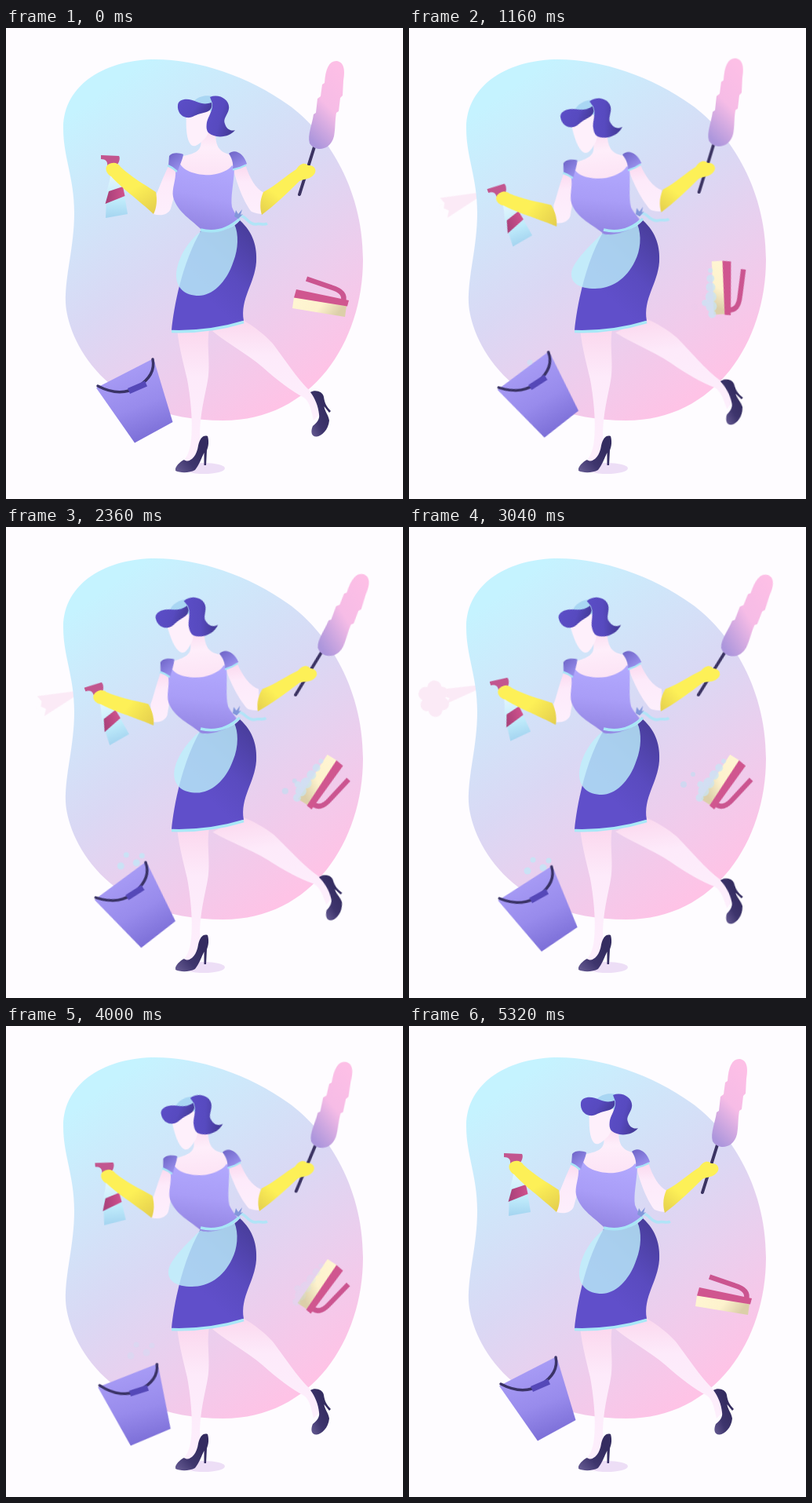
These frames come from a looping animation (506 by 600 pixels, 5.36 s). An HTML page:

```html
<!DOCTYPE html>
<html lang="en">
<head>
<meta charset="utf-8">
<title>Cleaning</title>
<style>
html, body { margin: 0; width: 100%; height: 100%; overflow: hidden; background: #fefcff; }
svg { display: block; width: 100%; height: 100%; }

.lean, .head, .fore, .reach, .duster, .ribbon, .apron, .kick, .bucket,
.splash, .bubbles, .brush, .foam, .drift, .cone, .puff {
  animation: 5.36s ease-in-out infinite;
}
.lean { animation-name: lean; transform-origin: 284px 246px; }
.head { animation-name: head; transform-origin: 255px 155px; }
.fore { animation-name: fore; transform-origin: 190px 225px; }
.reach { animation-name: reach; transform-origin: 325px 234px; }
.duster { animation-name: duster; transform-origin: 382px 185px; }
.ribbon { animation-name: ribbon; transform-origin: 296px 242px; }
.apron { animation-name: apron; }
.kick { animation-name: kick; transform-origin: 280px 385px; }
.bucket { animation-name: bucket; transform-origin: 170px 477px; }
.splash { animation-name: splash; transform-origin: 150px 432px; }
.bubbles { animation-name: bubbles; }
.brush { animation-name: brush; transform-origin: 402px 344px; }
.foam { animation-name: foam; }
.drift { animation-name: drift; }
.cone { animation-name: cone; transform-origin: 121px 165px; }
.puff { animation-name: puff; transform-origin: 62px 165px; }

@keyframes lean {
  0%, 6%, 85.8%, 100% { transform: none; }
  20%, 67.2% { transform: translate(-3px, 1px) rotate(-6deg); }
}
@keyframes head {
  0%, 7.5%, 93%, 100% { transform: rotate(0deg); }
  29.1%, 68.5% { transform: rotate(-12deg); }
}
@keyframes fore {
  0%, 6%, 76%, 100% { transform: none; }
  20%, 42% { transform: translate(0, 5px) rotate(-14deg); }
  53%, 60% { transform: translate(0, 4px) rotate(-9deg); }
}
@keyframes reach {
  0%, 87%, 100% { transform: rotate(0deg); }
  10% { transform: rotate(-2deg); animation-timing-function: ease-in; }
  21.6% { transform: rotate(6deg); animation-timing-function: linear; }
  32.1% { transform: rotate(12.5deg); animation-timing-function: ease-out; }
  48%, 60% { transform: rotate(13.5deg); }
  74.6% { transform: rotate(5.5deg); animation-timing-function: ease-out; }
}
@keyframes duster {
  0%, 89%, 100% { transform: rotate(0deg); }
  11% { transform: rotate(-4deg); animation-timing-function: ease-in; }
  21.6% { transform: rotate(-.4deg); animation-timing-function: linear; }
  32.1% { transform: rotate(1.5deg); animation-timing-function: ease-out; }
  48%, 60% { transform: rotate(7deg); }
  74.6% { transform: rotate(4deg); animation-timing-function: ease-out; }
}
@keyframes ribbon {
  0%, 6%, 75%, 100% { transform: none; }
  21%, 60% { transform: translate(-2px, -3px) rotate(-4deg); }
}
@keyframes apron {
  0%, 5.6%, 50%, 60%, 95%, 100% {
    d: path("M250 258C268 261 284 257 291 250C297 262 296 282 290 297C281 325 262 341 246 341C228 341 216 331 217 313C219 291 234 269 250 258Z");
  }
  20%, 33.5%, 71%, 76.5% {
    d: path("M250 258C268 261 284 257 291 250C297 264 295 284 288 297C277 320 258 332 237 332C217 332 206 325 207 312C209 297 232 276 250 258Z");
  }
}
@keyframes kick {
  0%, 5%, 73%, 100% { transform: rotate(0deg); }
  21.6% { transform: rotate(-7deg); animation-timing-function: ease-out; }
  32.1%, 42% { transform: rotate(-9deg); }
  56.7% { transform: rotate(-7deg); animation-timing-function: ease-in-out; }
}
@keyframes bucket {
  0%, 100% { transform: none; }
  21.6% { transform: translate(0, -7px) rotate(-9.5deg); animation-timing-function: ease-out; }
  32.1% { transform: translate(0, -8.5px) rotate(-13.5deg); }
  50% { transform: translate(0, 12px) rotate(-8deg); animation-timing-function: linear; }
  56.7% { transform: translate(0, 12px) rotate(-5.5deg); }
  74.6% { transform: translate(0, 7px) rotate(5.7deg); }
  87.3% { transform: translate(0, 5.5px) rotate(6.3deg); }
}
@keyframes splash {
  0%, 25% { opacity: 0; transform: scale(.1); animation-timing-function: ease-out; }
  32.1% { opacity: 1; transform: none; animation-timing-function: ease-out; }
  36% { opacity: .8; transform: translate(0, 4px) scale(1.1); }
  40%, 100% { opacity: 0; transform: translate(0, 12px) scale(1.08); }
}
@keyframes bubbles {
  0%, 19% { opacity: 0; transform: translate(-4px, 10px); }
  21.6% { opacity: .5; transform: translate(-4px, 2px); }
  32.1% { opacity: .8; transform: translate(-9px, -12px); }
  56.7% { opacity: .8; transform: none; }
  74.6% { opacity: .25; transform: translate(8px, -18px); }
  80%, 100% { opacity: 0; transform: translate(10px, -24px); }
}
@keyframes brush {
  0%, 5% { transform: none; animation-timing-function: ease-in; }
  21.6% { transform: translate(4px, -13px) rotate(78deg); animation-timing-function: ease-out; }
  30% { transform: translate(5px, -15px) rotate(114deg); }
  56.7% { transform: translate(4px, -15px) rotate(114deg); }
  74.6% { transform: translate(4px, -8px) rotate(115deg); animation-timing-function: ease-in; }
  87.3% { transform: translate(-5px, 3px) rotate(251deg); animation-timing-function: ease-out; }
  98%, 100% { transform: rotate(360deg); }
}
@keyframes foam {
  0%, 15% { opacity: 0; }
  21.6%, 58% { opacity: .75; }
  74.6% { opacity: .25; }
  79%, 100% { opacity: 0; }
}
@keyframes drift {
  0%, 20% { opacity: 0; transform: translate(14px, 28px); }
  32.1% { opacity: .8; transform: translate(11px, 16px); }
  56.7% { opacity: .7; transform: none; }
  68%, 100% { opacity: 0; transform: translate(-5px, -8px); }
}
@keyframes cone {
  0%, 20.1%, 42.5%, 52.9%, 79.1% { opacity: 1; transform: scale(0); animation-timing-function: ease-out; }
  21.6%, 44%, 54.4%, 80.6% { opacity: 1; transform: none; }
  23.9%, 46.3%, 56.8%, 82.8% { opacity: 1; transform: scaleY(.7); }
  26%, 48%, 58.6%, 84.8% { opacity: 0; transform: scaleY(.7); animation-timing-function: step-end; }
  100% { opacity: 0; transform: scale(0); }
}
@keyframes puff {
  0%, 21.6%, 44%, 54.4%, 80.6% { opacity: 0; transform: scale(.2); animation-timing-function: ease-out; }
  23.9%, 46.3%, 56.6%, 82.8% { opacity: 1; transform: none; }
  29.2%, 51.5%, 62%, 89% { opacity: 0; transform: translate(-2px, 0) scale(1.08); animation-timing-function: step-end; }
  100% { opacity: 0; transform: scale(.2); }
}
</style>
</head>
<body>
<svg viewBox="0 0 506 600" aria-label="Woman cleaning with spray, duster, bucket and brush">
  <defs>
    <linearGradient id="bg" gradientUnits="userSpaceOnUse" x1="110" y1="90" x2="375" y2="460">
      <stop stop-color="#c5f3ff"/><stop offset=".5" stop-color="#dad8f4"/><stop offset="1" stop-color="#fec3e6"/>
    </linearGradient>
    <linearGradient id="skirt" x1=".9" y1="0" x2=".4" y2=".7">
      <stop stop-color="#473c98"/><stop offset=".6" stop-color="#5a4bbf"/><stop offset="1" stop-color="#604fca"/>
    </linearGradient>
    <linearGradient id="bodice" x1=".6" y1="0" x2=".4" y2="1">
      <stop stop-color="#b2a9fe"/><stop offset=".5" stop-color="#a99df7"/><stop offset="1" stop-color="#9183e1"/>
    </linearGradient>
    <linearGradient id="sleeve" x1="0" y1="0" x2=".6" y2="1">
      <stop stop-color="#6d62c6"/><stop offset="1" stop-color="#9a92ee"/>
    </linearGradient>
    <linearGradient id="skin" x1="0" y1="0" x2="0" y2="1">
      <stop stop-color="#fbd8ee"/><stop offset=".35" stop-color="#fdeafa"/><stop offset="1" stop-color="#fdeffc"/>
    </linearGradient>
    <linearGradient id="chest" x1="0" y1="0" x2="0" y2="1">
      <stop stop-color="#fadcf0"/><stop offset=".4" stop-color="#feeefa"/><stop offset="1" stop-color="#fce3f5"/>
    </linearGradient>
    <linearGradient id="hair" x1="0" y1="0" x2="1" y2=".4">
      <stop stop-color="#5c4ec8"/><stop offset=".6" stop-color="#574abf"/><stop offset="1" stop-color="#463c9c"/>
    </linearGradient>
    <linearGradient id="cuffL" gradientUnits="userSpaceOnUse" x1="170" y1="200" x2="192" y2="235">
      <stop stop-color="#fdf057"/><stop offset="1" stop-color="#e3cd4d"/>
    </linearGradient>
    <linearGradient id="cuffR" gradientUnits="userSpaceOnUse" x1="345" y1="212" x2="324" y2="238">
      <stop stop-color="#fdf057"/><stop offset="1" stop-color="#e3cd4d"/>
    </linearGradient>
    <linearGradient id="bottle" x1="0" y1="0" x2="0" y2="1">
      <stop stop-color="#e6f6fd"/><stop offset=".6" stop-color="#bfebfb"/><stop offset="1" stop-color="#a4d4f0"/>
    </linearGradient>
    <linearGradient id="label" x1="0" y1="0" x2="1" y2="0">
      <stop stop-color="#a63f78"/><stop offset="1" stop-color="#d0528d"/>
    </linearGradient>
    <linearGradient id="feather" x1=".7" y1="0" x2=".3" y2="1">
      <stop stop-color="#fdbfe6"/><stop offset=".5" stop-color="#f6bce6"/><stop offset="1" stop-color="#ac96dc"/>
    </linearGradient>
    <linearGradient id="pail" x1=".3" y1=".1" x2=".6" y2="1">
      <stop stop-color="#a99df6"/><stop offset=".55" stop-color="#988bec"/><stop offset="1" stop-color="#7a6dd6"/>
    </linearGradient>
    <linearGradient id="shoe" x1="0" y1="1" x2=".7" y2=".3">
      <stop stop-color="#6a5f96"/><stop offset=".5" stop-color="#3e356d"/><stop offset="1" stop-color="#342c60"/>
    </linearGradient>
    <linearGradient id="bristle" x1="0" y1="0" x2="1" y2=".3">
      <stop stop-color="#fff6d3"/><stop offset=".6" stop-color="#fdf2cd"/><stop offset="1" stop-color="#dccfa9"/>
    </linearGradient>
  </defs>

  <!-- Spray, partly hidden by the backdrop -->
  <g class="lean"><g class="fore" fill="#fbeaf6">
    <path class="cone" d="M121 165L61 152L64 160L61 166L66 171L61 179Z"/>
    <g class="puff">
      <circle cx="47" cy="165" r="14"/><circle cx="38" cy="156" r="9"/><circle cx="51" cy="151" r="9"/>
      <circle cx="58" cy="160" r="8"/><circle cx="56" cy="174" r="8"/><circle cx="45" cy="179" r="9"/>
      <circle cx="36" cy="170" r="8"/>
    </g>
  </g></g>

  <path fill="url(#bg)" d="M190 40C130 40 73 70 73 128C73 165 87 190 87 235C87 280 75 315 76 350C78 395 125 500 277 500C390 500 455 400 455 295C455 200 405 130 360 98C310 62 245 40 190 40Z"/>

  <!-- Bucket -->
  <g class="splash" fill="#c8edfb">
    <path d="M69 407C78 404 89 407 95 417C85 417 75 415 69 407Z"/>
    <path d="M103 407C113 403 125 409 130 420C119 421 108 417 103 407Z"/>
    <path d="M82 430C94 425 110 430 118 440C105 442 89 440 82 430Z"/>
  </g>
  <g class="bubbles" fill="#c3e6f7">
    <circle cx="151" cy="438" r="4.500"/><circle cx="158" cy="424" r="3.500"/>
    <circle cx="171" cy="434" r="4.500"/><circle cx="178" cy="425" r="3.500"/>
  </g>
  <g class="bucket">
    <path fill="url(#pail)" d="M115 458.500L188 421L212.500 502L164 528.500Z"/>
    <path fill="none" stroke="#3a3366" stroke-width="3.5" stroke-linecap="round" d="M117 456C138 467 155 465 168 457C182 448 190 436 187 422"/>
    <path fill="#5548b8" d="M155 459L177 449.500L180 456.500L158 466Z"/>
  </g>

  <!-- Brush -->
  <g class="drift" fill="#c5dcf1">
    <circle cx="350" cy="328" r="4"/><circle cx="362" cy="315" r="3"/>
  </g>
  <g class="brush">
    <path fill="none" stroke="#cb5590" stroke-width="6.500" d="M383 319.500L415 330.500C427 334 432 340 430 348"/>
    <path fill="url(#bristle)" d="M367 343L434 354L432 368L365 357Z"/>
    <path fill="#d0568f" d="M370 333L437 347L435 354.500L367 343.500Z"/>
    <g class="foam" fill="#c8e5f5">
      <circle cx="376" cy="361" r="3"/><circle cx="386" cy="363" r="5"/><circle cx="397" cy="365" r="6"/>
      <circle cx="409" cy="367" r="7"/><circle cx="421" cy="369" r="7"/><circle cx="431" cy="370" r="5"/>
      <circle cx="415" cy="376" r="4"/>
    </g>
  </g>

  <!-- Legs -->
  <ellipse cx="252" cy="561" rx="27" ry="7" fill="#eddef6"/>
  <g class="kick">
    <path fill="url(#skin)" d="M263 386C284 403 307 415 327 432C346 449 365 463 380 471C388 477 389 488 392 500L400 492C398 480 394 470 388 463C371 447 354 420 340 402C330 391 316 380 302 372Z"/>
    <path fill="url(#shoe)" d="M388 464C394 460 404 463 405 470C406 478 409 483 414 488L412 490L405.500 482C406 488 411 493 412 500C411 512 402 520 396 520.500C389 521 388 514 391 507C397 502 400 498 399 492C398 482 394 472 388 464Z"/>
  </g>
  <path fill="url(#skin)" d="M218 384C221 410 227 430 231 448C236 475 239 510 235 532C233 542 229 548 226 552L240 556C246 540 248 525 247 515C248 490 253 470 256 455C262 430 255 405 259 384Z"/>
  <path fill="url(#shoe)" d="M216 561C218 556 223 552 227 550C233 555 243 547 245 532C247 523 251 518 257 520C259 527 258 533 256 538L255 557L252.500 557L252.500 541C249 548 246 557 241 563C234 567 222 567 216 564Z"/>

  <!-- Arm with spray bottle -->
  <g class="lean">
    <path fill="url(#skin)" d="M208 174C200 190 195 205 190 215L188 237C197 240 207 238 210 230C214 215 219 200 220 182Z"/>
    <g class="fore">
      <path fill="url(#bottle)" d="M133 186L140 186C142 193 149 197 150 206L155 237L127 242L128 215C128 203 133 197 133 186Z"/>
      <path fill="url(#label)" d="M131 208L149 202L151.500 214L126.500 224Z"/>
      <path fill="#c2568f" d="M121 162L144 163C146 166 144 172 141 175L129 176C130 170 127 167 121 167Z"/>
      <path fill="url(#cuffL)" d="M146 177C160 190 176 199 191 209C193 219 192 229 188 237C170 220 145 202 134 189C128 186 125 178 130 174C137 170 143 172 146 177Z"/>
    </g>
  </g>

  <!-- Skirt and apron -->
  <path fill="url(#skirt)" d="M249 257C270 262 290 256 298 245C316 261 320 280 319 298C317 326 298 345 303 373C275 383 240 388 211 385C214 355 224 300 249 257Z"/>
  <path fill="none" stroke="#a9e8f7" stroke-width="3.500" d="M211 386.500Q259 388 303 374.500"/>
  <path class="apron" fill="#bdf1fc" fill-opacity=".8" d="M250 258C268 261 284 257 291 250C297 262 296 282 290 297C281 325 262 341 246 341C228 341 216 331 217 313C219 291 234 269 250 258Z"/>

  <!-- Torso, head and arm with duster -->
  <g class="lean">
    <path fill="url(#skin)" d="M289 176C294 200 305 225 313 234C318 236 322 237 327 237L329 210C318 205 310 190 305 174Z"/>
    <g class="reach">
      <g class="duster">
        <path stroke="#3b3362" stroke-width="4" stroke-linecap="round" d="M374 212L395 145"/>
        <path fill="url(#feather)" d="M387 147C384 136 390 124 392 110L395 108L397 90L401 87L403 72L406 70C407 52 412 42 421 42C432 43 432 56 430 67L429 86L426 89L424 106L421 108C419 120 420 128 418 138C413 157 394 158 387 147Z"/>
      </g>
      <path fill="url(#cuffR)" d="M328 209C345 200 358 187 370 180C375 172 381 171 385 175C392 174 397 180 393 186C388 193 380 192 374 195C358 211 342 226 326 238C323 228 324 218 328 209Z"/>
    </g>
    <path fill="url(#chest)" d="M247 136C251 152 248 159 226 163L219 172C230 192 275 194 290 174L285 161C272 158 265 150 268 128Z"/>
    <path fill="url(#bodice)" d="M221 171C226 185 250 188 262 187C275 185 284 181 288 175L291 180C290 200 286 215 288 228C291 236 295 240 297 244C286 258 264 262 250 258C238 245 218 235 213 215C211 205 217 193 216 182Z"/>
    <path fill="url(#sleeve)" d="M208 163C212 158 221 159 226 161C225 169 221 174 219 183C215 180 210 178 207 176Z"/>
    <path fill="url(#sleeve)" d="M284 160C292 153 303 160 307 173C302 177 295 178 289 180C290 172 288 166 284 160Z"/>
    <path fill="none" stroke="#a9e4f7" stroke-width="2.500" d="M206 175Q213 178 218 183M289 180.500Q298 179 306 174.500"/>
    <g class="head">
      <path fill="#fef0fb" d="M230 108C229 127 230 143 236 149C241 153 247 147 251 143C259 138 262 122 260 102Z"/>
      <path fill="#a9d6f3" d="M238 95C244 87 254 85 264 87L263 106L248 103Z"/>
      <path fill="url(#hair)" d="M219 98C220 89 234 89 243 94C250 97 256 97 262 95C264 104 258 107 250 108.500C241 110 238 115 230 114C223 113 218 106 219 98Z"/>
      <path fill="url(#hair)" d="M260 88C272 83 286 92 284 103C283 110 276 116 279 122C281 129 287 132 292 130C286 138 272 141 262 136C255 133 255 127 256 120C258 112 264 105 263 96Z"/>
    </g>
  </g>
  <path fill="none" stroke="#a8e6f6" stroke-width="3.500" d="M248 257Q275 264 298 243"/>
  <g class="ribbon">
    <path fill="none" stroke="#b1e4f7" stroke-width="3.500" d="M295 241C306 235 306 250 318 250C324 248 328 252 333 249"/>
    <path fill="#8296da" d="M291 240L293 232L296 237L301 231L299 238L302 237L296 243Z"/>
  </g>
</svg>
</body>
</html>
```
